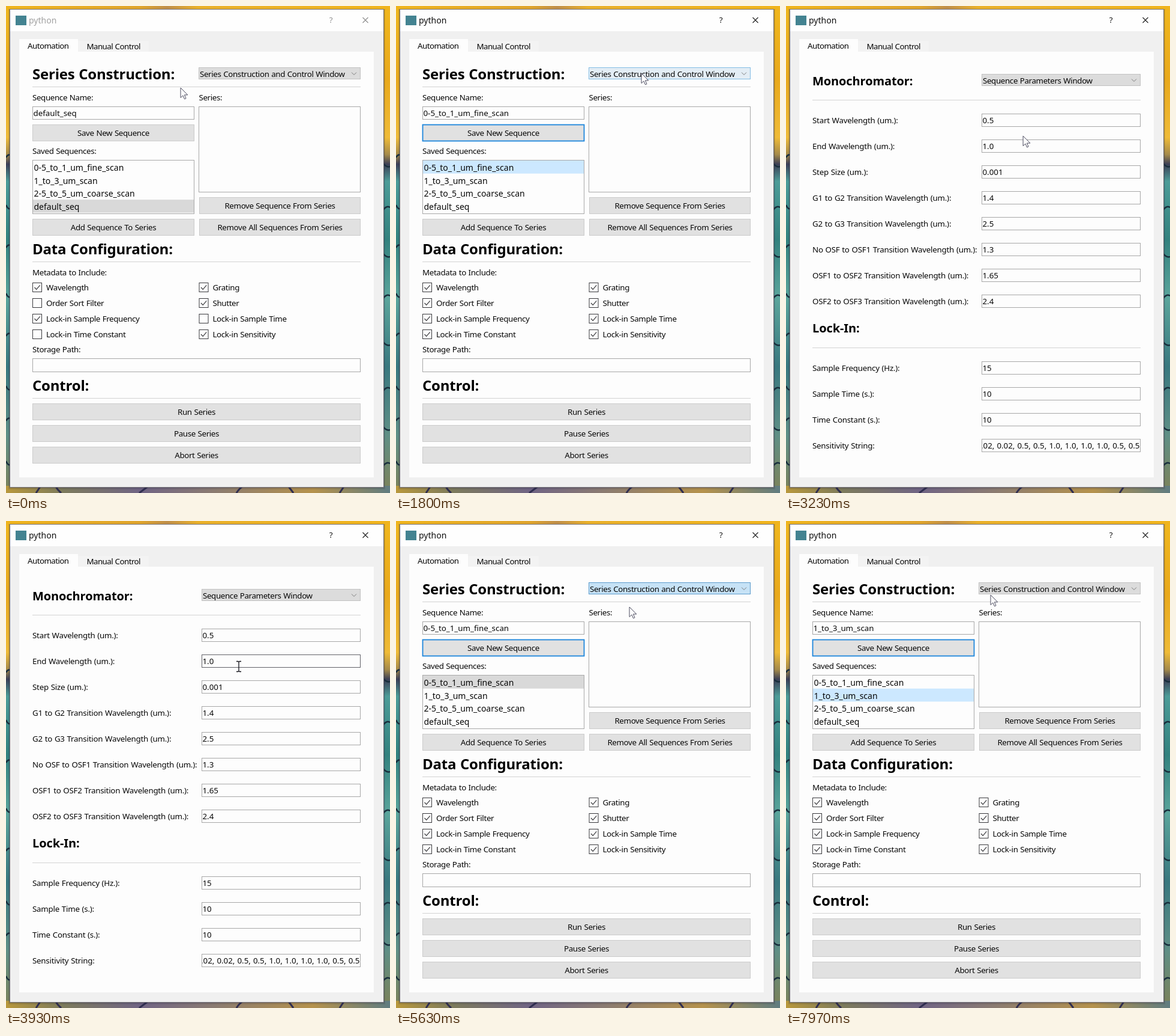
Write an HTML page that moves like this. It is 640 by 810 pixels and loops after 8 s.

```html
<!DOCTYPE html>
<html lang="en">
<head>
<meta charset="utf-8">
<title>Sequence builder</title>
<style>
  html, body { margin: 0; width: 100%; height: 100%; overflow: hidden; background: #d9b45a; }
  svg { display: block; width: 640px; height: 810px; }
  text { font: 13.33px "Noto Sans", "Open Sans", sans-serif; fill: #080808; letter-spacing: -.36px; word-spacing: .6px; white-space: pre; }
  .label { letter-spacing: -.24px; }
  .value { letter-spacing: 0; }
  .tab { letter-spacing: -.56px; }
  .list { font-size: 14px; letter-spacing: 0; }
  .h1 { font-size: 24px; font-weight: 700; letter-spacing: -.2px; fill: #000; }
  .h2 { font-size: 20px; font-weight: 700; letter-spacing: -.1px; fill: #000; }
  .button { fill: #e1e1e1; stroke: #cbcbcb; }
  .field { fill: #fdfdfd; stroke: #a8a8a8; }
  .field.hot { stroke: #626268; }
  .rule { stroke: #d3d3d3; }
  .check { fill: #fdfdfd; stroke: #3a3a3e; }
  .tick, .chevron { fill: none; stroke: #3a3a3e; stroke-width: 1.2; }
  .chevron { stroke: #7c7c7c; stroke-width: 1; }
</style>
</head>
<body>
<svg id="stage" viewBox="0 0 640 810" xmlns="http://www.w3.org/2000/svg"></svg>
<script>
const LOOP = 8000;
const stage = document.getElementById('stage');
const $ = id => document.getElementById(id);

// Markup helpers
const rect = (x, y, w, h, attrs) => `<rect x="${x}" y="${y}" width="${w}" height="${h}" ${attrs}/>`;
const box = (x, y, w, h, attrs) => rect(x + .5, y + .5, w - 1, h - 1, attrs);
const text = (x, y, s, attrs = '') => `<text x="${x}" y="${y}" ${attrs}>${s}</text>`;
const path = (d, attrs) => `<path d="${d}" ${attrs}/>`;
const rule = y => path(`M44 ${y}.5H591`, 'class="rule"');

const fields = [];
function field(page, x, y, w, h) {
  fields.push({ page, x, y, w, h });
  return box(x, y, w, h, `class="field" id="field${fields.length - 1}"`);
}

function button(x, y, w, label, id = '') {
  return box(x, y, w, 28, `class="button" id="${id}"`) +
    text(x + w / 2, y + 18.8, label, 'text-anchor="middle"');
}

function combo(id, x, y, label) {
  return box(x, y, 591 - x, 20, `id="${id}"`) + text(x + 2, y + 15.5, label) +
    path(`M576 ${y + 8.5}l4 4 4-4`, 'class="chevron"');
}

function checkbox(x, y, label, id) {
  return box(x, y, 16, 16, 'class="check"') +
    path(`M${x + 3.5} ${y + 8}l3.2 3.4 6-7`, `class="tick" id="${id}"`) +
    text(x + 23, y + 13, label);
}

// Coloured-glass wallpaper, visible only around the window
function wallpaper() {
  const gradient = (id, list, attrs = '') => `<linearGradient id="${id}" ${attrs}>` +
    list.map(([o, c]) => `<stop offset="${o}" stop-color="${c}"/>`).join('') + '</linearGradient>';
  const leads = [252, 331, 402, 478, 549, 632, 690, 757].map((y, i) =>
    `M0 ${y}q4 ${i % 2 ? 9 : -7} 8 ${i % 2 ? 5 : -3}M628 ${y + 9}q6 ${i % 2 ? -9 : 8} 12 ${i % 2 ? -5 : 6}`).join('');
  return gradient('side', [[0, '#f0b71e'], [.15, '#e9a91c'], [.27, '#efbb38'], [.305, '#a58a4a'], [.325, '#3c3f56'],
      [.36, '#4c9c98'], [.48, '#33827f'], [.6, '#5ba59c'], [.74, '#39787f'], [.88, '#5f8f86'], [1, '#7d8258']], 'x2="0" y2="1"') +
    gradient('top', [[0, '#efb41c'], [.35, '#dfa42c'], [.42, '#c08e48'], [.5, '#e9b02a'], [1, '#f0b41c']]) +
    gradient('bottom', [[0, '#b8983c'], [.15, '#7c7a5c'], [.35, '#706484'], [.55, '#8c7c70'], [.8, '#b5924c'], [1, '#607c80']]) +
    rect(0, 0, 640, 810, 'fill="url(#side)"') +
    rect(0, 0, 640, 8, 'fill="url(#top)"') + rect(0, 798, 640, 12, 'fill="url(#bottom)"') +
    path(leads, 'fill="none" stroke="#182e3c" stroke-width="2.5"') +
    path('M50 810l8-12M82 798q4 7 10 12M222 810l16-12M384 810q5-8 12-12M470 798l9 12M556 810l8-12',
      'fill="none" stroke="#302e50" stroke-width="3"') +
    rect(4, 5, 628, 799, 'fill="#241f38" opacity=".13"') +
    rect(5, 5, 626, 797, 'fill="#241f38" opacity=".16"');
}

function frame() {
  return box(6, 5, 624, 796, 'fill="#f0f0f0" stroke="#77757c"') +
    rect(7, 6, 622, 36, 'fill="#fefefe"') +
    rect(16, 16, 18, 16, 'fill="#438391"') +
    text(38, 29, 'python', 'class="list" id="title"') +
    text(541.5, 28, '?', 'text-anchor="middle" id="help"') +
    path('M594.5 19l9 9m0-9l-9 9', 'id="close" fill="none" stroke-width="1.1"') +
    rect(22, 76, 591, 708, 'fill="#fdfdfd"') +
    rect(22, 55, 98, 22, 'fill="#fdfdfd"') +
    rect(120, 58, 118, 18, 'fill="#f3f3f3"') +
    text(36, 70.5, 'Automation', 'class="tab"') +
    text(134.5, 72, 'Manual Control', 'class="tab"');
}

const sequences = ['0-5_to_1_um_fine_scan', '1_to_3_um_scan', '2-5_to_5_um_coarse_scan', 'default_seq'];
const rowY = i => 257 + i * 21.7;

function seriesPage() {
  const meta = ['Wavelength', 'Order Sort Filter', 'Lock-in Sample Frequency', 'Lock-in Time Constant',
    'Grating', 'Shutter', 'Lock-in Sample Time', 'Lock-in Sensitivity'];
  return text(44, 121.5, 'Series Construction:', 'class="h1"') +
    combo('combo0', 321, 102, 'Series Construction and Control Window') + rule(134) +
    text(44, 156.5, 'Sequence Name:') + text(321.5, 156.5, 'Series:') +
    field(0, 44, 167, 270, 22) + text(45.5, 183, '', 'class="value" id="name"') +
    button(44, 197, 270, 'Save New Sequence', 'save') +
    text(44, 245.5, 'Saved Sequences:') +
    box(44, 256, 270, 90, 'class="field"') +
    rect(45, 0, 268, 21.7, 'id="hover" fill="#e5f3ff"') +
    rect(45, 0, 268, 21.7, 'id="selected"') +
    sequences.map((s, i) => text(46.5, rowY(i) + 17, s, 'class="list"')).join('') +
    box(321, 167, 270, 143, 'class="field"') +
    button(322, 318, 269, 'Remove Sequence From Series') +
    button(44, 354, 270, 'Add Sequence To Series') +
    button(322, 354, 269, 'Remove All Sequences From Series') +
    text(44, 413, 'Data Configuration:', 'class="h1"') + rule(425) +
    text(44, 448, 'Metadata to Include:') +
    meta.map((m, i) => checkbox(i < 4 ? 44 : 321.5, 460 + i % 4 * 26, m, 'tick' + i)).join('') +
    text(44, 576, 'Storage Path:') + field(0, 44, 586, 547, 23) +
    text(44, 640, 'Control:', 'class="h1"') + rule(652) +
    ['Run Series', 'Pause Series', 'Abort Series'].map((s, i) => button(44, 661 + i * 36, 547, s)).join('');
}

function parameterPage() {
  const row = (y, [label, value]) => text(44, y + 5, label, 'class="label"') + field(1, 326, y - 11, 265, 22) +
    (value.length < 9 ? text(327.5, y + 5, value, 'class="value"')
      : `<g clip-path="url(#clip)">${text(589.5, y + 5, value, 'text-anchor="end" class="value"')}</g>`);
  const mono = [['Start Wavelength (um.):', '0.5'], ['End Wavelength (um.):', '1.0'], ['Step Size (um.):', '0.001'],
    ['G1 to G2 Transition Wavelength (um.):', '1.4'], ['G2 to G3 Transition Wavelength (um.):', '2.5'],
    ['No OSF to OSF1 Transition Wavelength (um.):', '1.3'], ['OSF1 to OSF2 Transition Wavelength (um.):', '1.65'],
    ['OSF2 to OSF3 Transition Wavelength (um.):', '2.4']];
  const lock = [['Sample Frequency (Hz.):', '15'], ['Sample Time (s.):', '10'], ['Time Constant (s.):', '10'],
    ['Sensitivity String:', '0.02, 0.02, 0.5, 0.5, 1.0, 1.0, 1.0, 1.0, 0.5, 0.5']];
  return `<clipPath id="clip">${rect(327, 720, 263, 22, '')}</clipPath>` +
    text(44, 131.5, 'Monochromator:', 'class="h2"') +
    combo('combo1', 326, 113, 'Sequence Parameters Window') + rule(156) +
    mono.map((r, i) => row(190 + i * 43, r)).join('') +
    text(44, 543, 'Lock-In:', 'class="h2"') + rule(568) +
    lock.map((r, i) => row(602 + i * 43, r)).join('');
}

stage.innerHTML = wallpaper() + frame() +
  `<g id="page0">${seriesPage()}</g><g id="page1">${parameterPage()}</g>` +
  path('M0 0V16.5L3.9 12.9 6.5 18.8 9 17.7 6.4 11.9H11.8Z', 'id="arrow" fill="#fdfdfd" stroke="#4c4c60" stroke-width="1"') +
  path('M-4 -8.5H-1.2L0 -7.5 1.2 -8.5H4M0 -7.5V7.5M-4 8.5H-1.2L0 7.5 1.2 8.5H4',
    'id="beam" fill="none" stroke="#101018" stroke-width="1.3"');

// Pointer stops: time, x, y
const stops = [[0, 291, 136], [750, 140, 268], [1050, 140, 268], [1700, 409, 112], [2000, 409, 112],
  [2350, 415, 144], [2700, 415, 144], [3500, 388, 242], [4150, 388, 242], [4800, 385, 123],
  [5050, 385, 123], [5350, 389, 143], [5720, 389, 143], [6500, 128, 290], [7050, 128, 290], [7970, 341, 123]];
const FIRST_PICK = 900, OPEN_PARAMS = 2420, OPEN_SERIES = 5420, SECOND_PICK = 6850;

function pointer(t) {
  const i = stops.findIndex(s => s[0] > t);
  if (i < 0) return stops[stops.length - 1].slice(1);
  const [t0, x0, y0] = stops[i - 1], [t1, x1, y1] = stops[i];
  const p = (t - t0) / (t1 - t0), e = p * p * (3 - 2 * p);
  return [x0 + (x1 - x0) * e, y0 + (y1 - y0) * e];
}

const set = (id, attrs) => { for (const k in attrs) $(id).setAttribute(k, attrs[k]); };
const show = (id, on) => set(id, { visibility: on ? 'inherit' : 'hidden' });
const between = (t, a, b) => t >= a && t < b;

function draw(t) {
  const [x, y] = pointer(t);
  const inside = b => between(x, b.x, b.x + b.w) && between(y, b.y, b.y + b.h);
  const active = t >= FIRST_PICK;
  const page = +between(t, OPEN_PARAMS, OPEN_SERIES);
  const pick = !active ? 3 : t < SECOND_PICK ? 0 : 1;

  set('title', { style: `fill:${active ? '#101010' : '#a2a2a2'}` });
  set('help', { style: `fill:${active ? '#101010' : '#8d8d8d'}` });
  set('close', { stroke: active ? '#202020' : '#8d8d8d' });
  set('page0', { visibility: page ? 'hidden' : 'visible' });
  set('page1', { visibility: page ? 'visible' : 'hidden' });

  $('name').textContent = sequences[pick];
  const listFocus = between(t, FIRST_PICK, OPEN_PARAMS) || t >= SECOND_PICK;
  set('selected', { y: rowY(pick), fill: listFocus ? '#cce8ff' : '#d9d9d9' });
  const row = Math.floor((y - 257) / 21.7);
  const overList = between(x, 45, 313) && between(row, 0, 4);
  show('hover', !page && overList && row !== pick);
  if (overList) set('hover', { y: rowY(row) });
  set('save', { style: active ? 'stroke:#1c86dc;stroke-width:1.8' : '' });
  for (let i = 0; i < 8; i++) show('tick' + i, active || ![1, 3, 6].includes(i));

  const lit = between(t, 2000, 2850) || between(t, 5050, 5850);
  [321, 326].forEach((cx, i) => {
    const hot = i === page && inside({ x: cx, y: i ? 113 : 102, w: 591 - cx, h: 20 });
    set('combo' + i, {
      fill: lit ? '#c6e2f6' : hot ? '#e3edf5' : '#dcdcdc',
      stroke: lit ? '#5b9bcc' : hot ? '#83bde4' : '#c2c2c2'
    });
  });

  let typing = false;
  fields.forEach((f, i) => {
    const hot = f.page === page && inside(f);
    typing = typing || hot;
    set('field' + i, { class: hot ? 'field hot' : 'field' });
  });
  const at = `translate(${x.toFixed(1)} ${y.toFixed(1)})`;
  set('arrow', { transform: at });
  set('beam', { transform: at });
  show('arrow', !typing);
  show('beam', typing);
}

const start = performance.now();
function tick() {
  draw((performance.now() - start) % LOOP);
  requestAnimationFrame(tick);
}
tick();
</script>
</body>
</html>
```
